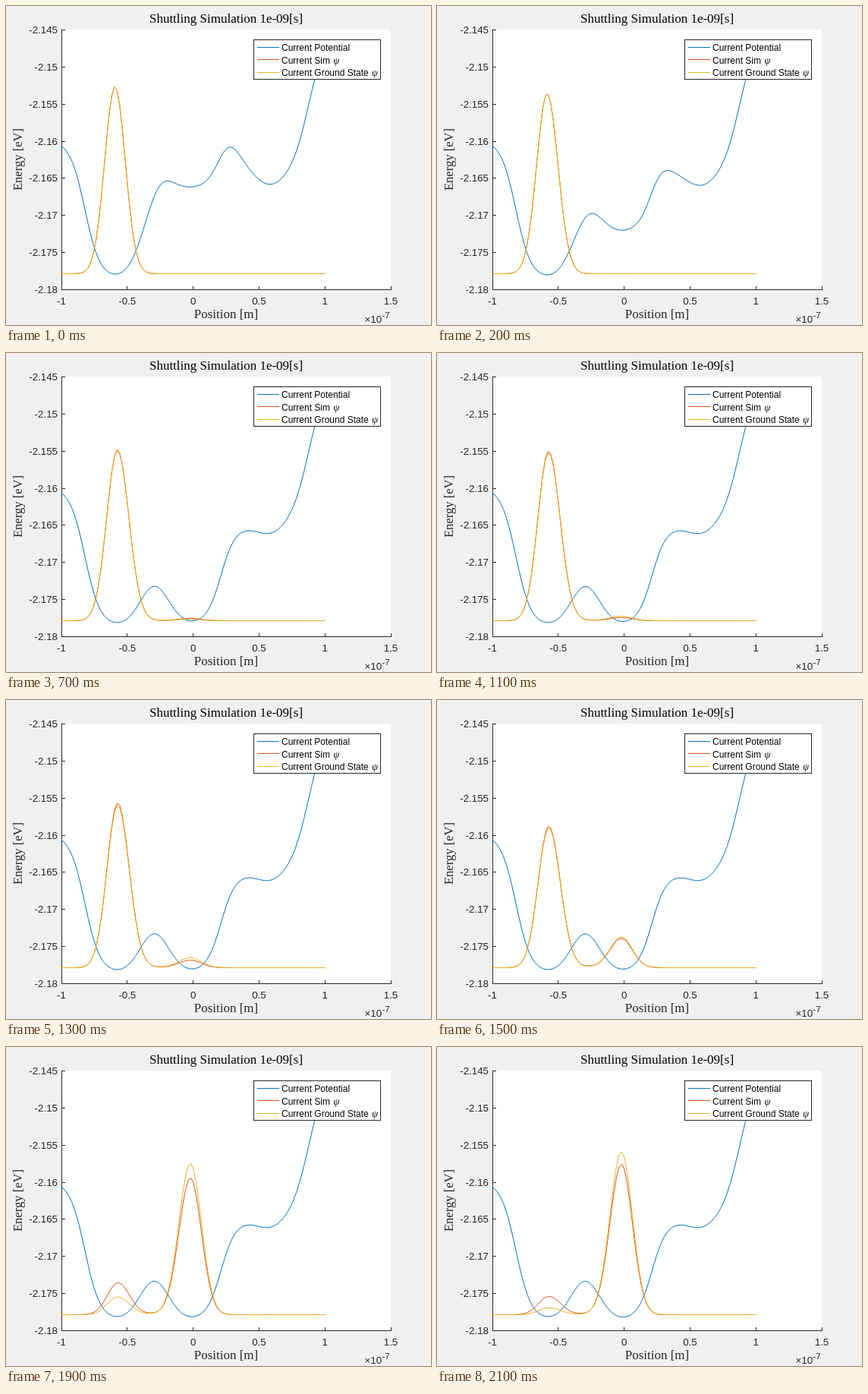
These frames come from a looping animation (560 px wide and 420 px high, 2.2 s). An HTML page:

```html
<!DOCTYPE html>
<html lang="en">
<head>
<meta charset="utf-8">
<title>Shuttling Simulation</title>
<style>
  html, body { margin: 0; width: 100%; height: 100%; overflow: hidden; background: #f0f0f0; }
  svg { display: block; width: 560px; height: 420px; }
  text { font: 13.33px "Liberation Sans", Arial, sans-serif; fill: #262626; }
  .tex { font: 17px "Liberation Serif", "Times New Roman", serif; }
  .key text { font-size: 12px; fill: #000; }
  .key .psi { font: italic 13px "Liberation Serif", serif; }
  .mid { text-anchor: middle; }
  .end { text-anchor: end; }
  .axis { stroke: #262626; fill: none; shape-rendering: crispEdges; }
  .curve { fill: none; stroke-linejoin: round; }
  .blue { stroke: #0072bd; }
  .orange { stroke: #d95319; }
  .gold { stroke: #edb120; }
</style>
</head>
<body>
<svg viewBox="0 0 560 420">
  <rect width="560" height="420" fill="#f0f0f0"/>
  <rect x="73" y="31" width="434" height="343" fill="#fff"/>
  <path id="axes" class="axis"/>
  <g id="labels"></g>
  <text x="472.5" y="417">×10</text>
  <text x="495.5" y="411" style="font-size:11.5px">-7</text>
  <text class="tex mid" x="290" y="22" style="fill:#000">Shuttling Simulation 1e-09[s]</text>
  <text class="tex mid" x="290" y="411">Position [m]</text>
  <text class="tex mid" transform="translate(21 202) rotate(-90)" style="font-size:16.6px">Energy [eV]</text>

  <path id="potential" class="curve blue"/>
  <path id="sim" class="curve orange"/>
  <path id="ground" class="curve gold"/>

  <g class="key">
    <rect x="326.5" y="44.5" width="167" height="52" fill="#fff" stroke="#262626"/>
    <path class="blue" d="M331 54.5H360"/>
    <path class="orange" d="M331 70.5H360"/>
    <path class="gold" d="M331 87.5H360"/>
    <text x="363" y="59">Current Potential</text>
    <text x="363" y="76">Current Sim <tspan class="psi" dx="1">ψ</tspan></text>
    <text x="363" y="92">Current Ground State <tspan class="psi" dx="1">ψ</tspan></text>
  </g>
</svg>
<script>
const LOOP = 2200, STEP = 100;
const X0 = 73.4, DX = 3.472, CELLS = 100, BASE = 352.5;
const RAMP = 4, LAST = 21;
const el = id => document.getElementById(id);
const clamp = v => Math.min(Math.max(v, 0), 1);
const mix = (a, b, p) => a + (b - a) * p;
const step = (x, c, s) => 1 / (1 + Math.exp((c - x) / s));
const bell = (x, c, s) => Math.exp(-(((x - c) / s) ** 2) / 2);

// The gate over the second well opens fast, then creeps through resonance
const ramp = k => clamp(k / RAMP);
const creep = k => clamp((k - RAMP) / (LAST - RAMP));

function plot(id, f) {
  const pts = Array.from({ length: CELLS + 1 }, (_, i) => {
    const x = X0 + DX * i;
    return x.toFixed(2) + " " + f(x).toFixed(2);
  });
  el(id).setAttribute("d", "M" + pts.join("L"));
}

function potential(k) {
  const closed = 1 - 0.972 * ramp(k) - 0.028 * creep(k);
  return x => 176.4
    + 183 * step(x, 104, 10)
    - 51 * bell(x, 195.4, 19)
    - 130 * step(x, 283.4, 9.5)
    + 10.3 * bell(x, 348.4, 17)
    - 200 * step(x, 398.9, 11.6)
    - 121 * closed * (step(x, 196.4, 12.4) - step(x, 300.4, 12.4));
}

// Share of each state that sits in the second well
function groundShare(k) {
  const d = 0.53 * (k - 16.57) - 12 * Math.max(0, RAMP - k);
  return (1 + d / Math.hypot(d, 1)) / 2;
}
const simShare = k => 0.014 * clamp((k - 3) / 3) + 0.895 * step(k, 16.7, 1.1);

// Squared sum of one bell per well
function wave(k, share) {
  const r = ramp(k), left = 143.6 + 3 * r + 1.2 * creep(k), right = 243;
  const height = 246.5 - 18.5 * r - 16 * share * (1 - share) - 4 * share;
  const a = Math.sqrt(height * (1 - share)), b = Math.sqrt(height * share);
  return x => {
    const sa = mix(13.5, x > left ? 15.1 : 14.1, r), sb = x < right ? 15.2 : 14.5;
    return BASE - (a * bell(x, left, sa * Math.SQRT2) + b * bell(x, right, sb * Math.SQRT2)) ** 2;
  };
}

function buildAxes() {
  let d = "M73.5 31V373.5H507", labels = "";
  for (let i = 0; i < 8; i++) {
    const y = Math.round(30.8 + 48.9 * i);
    d += `M73 ${y + 0.5}h5`;
    labels += `<text class="end" x="68" y="${y + 5}">${+(-2.145 - 0.005 * i).toFixed(3)}</text>`;
  }
  for (let i = 0; i < 6; i++) {
    const x = 73 + 86.8 * i;
    d += `M${Math.floor(x) + 0.5} 374v-5`;
    labels += `<text class="mid" x="${x}" y="393">${i / 2 - 1}</text>`;
  }
  el("axes").setAttribute("d", d);
  el("labels").innerHTML = labels;
}

let start, shown = -1;
function draw(now) {
  start ??= now;
  const k = Math.floor((Math.max(0, now - start) % LOOP) / STEP);
  if (k !== shown) {
    shown = k;
    plot("potential", potential(k));
    plot("sim", wave(k, simShare(k)));
    plot("ground", wave(k, groundShare(k)));
  }
  requestAnimationFrame(draw);
}

buildAxes();
draw(performance.now());
</script>
</body>
</html>
```
